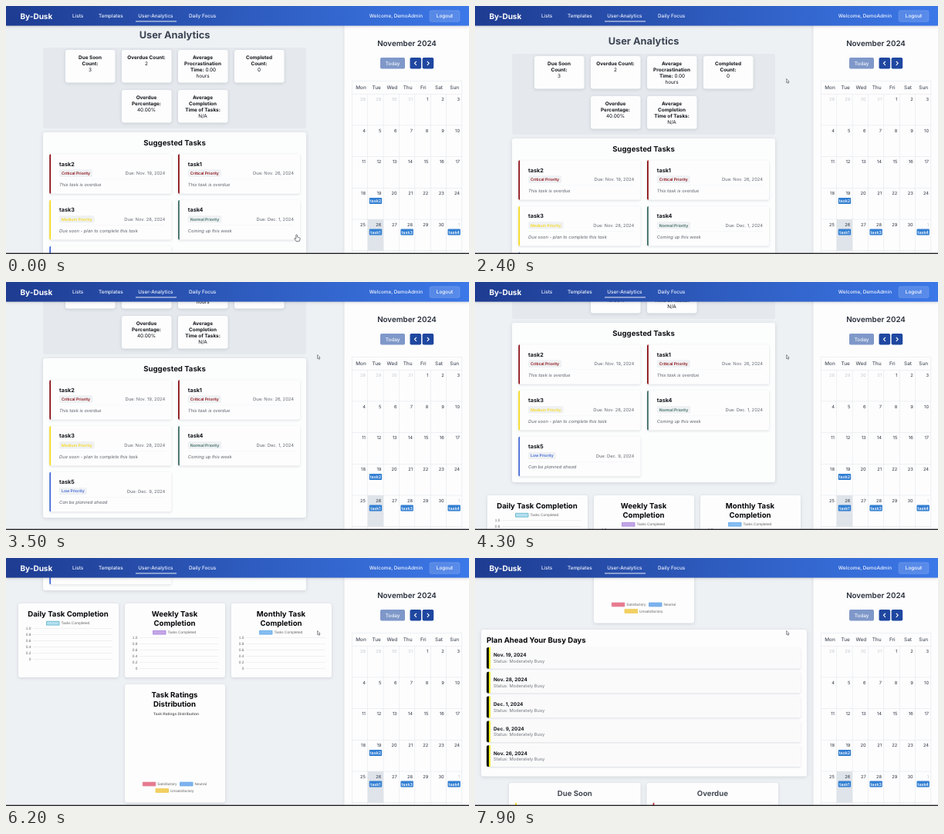
These frames come from a looping animation (600 by 322 pixels, 8 s). An HTML page with a canvas:

```html
<!DOCTYPE html>
<html lang="en">
<head>
<meta charset="utf-8">
<title>User Analytics</title>
<style>
html, body { margin: 0; width: 100%; height: 100%; overflow: hidden; background: #eef1f4; }
canvas { display: block; width: 600px; height: 322px; }
</style>
</head>
<body>
<canvas id="stage"></canvas>
<script>
const W = 600, H = 322, LOOP = 8000, STEP = 100;
const canvas = document.getElementById('stage');
const ctx = canvas.getContext('2d');
const dpr = window.devicePixelRatio || 1;
canvas.width = W * dpr;
canvas.height = H * dpr;
ctx.textRendering = 'geometricPrecision';

const INTER = 'Inter, sans-serif';
const ARIAL = '"Liberation Sans", Arial, sans-serif';
const INK = '#111318', GREY = '#656a72';

// y is the middle of the capital letters
function text(str, x, y, size, weight, color, align = 'left', family = INTER) {
  ctx.font = `${weight} ${size}px ${family}`;
  ctx.fillStyle = color;
  ctx.textAlign = align;
  ctx.fillText(str, x, y + size * 0.364);
}

function rect(x, y, w, h, color) {
  ctx.fillStyle = color;
  ctx.fillRect(x, y, w, h);
}

function round(x, y, w, h, r, color, stroke) {
  ctx.beginPath();
  ctx.roundRect(x, y, w, h, r);
  if (color) { ctx.fillStyle = color; ctx.fill(); }
  if (stroke) { ctx.strokeStyle = stroke; ctx.stroke(); }
}

function card(x, y, w, h, r = 3, color = '#fdfdfe', blur = 4) {
  ctx.save();
  ctx.shadowColor = 'rgba(30,41,59,.15)';
  ctx.shadowBlur = blur * dpr;
  ctx.shadowOffsetY = dpr;
  round(x, y, w, h, r, color);
  ctx.restore();
}

// piecewise linear value from [time, value] points
function track(points, t) {
  for (let i = 1; i < points.length; i++) {
    const [t0, a] = points[i - 1], [t1, b] = points[i];
    if (t <= t1) return a + (b - a) * (t - t0) / (t1 - t0);
  }
  return points[points.length - 1][1];
}

const SCROLL = [[0, 8], [400, 0], [2600, 0], [3500, 73], [4300, 119],
  [5200, 219], [6200, 337], [7900, 570]];

function drawStats() {
  text('User Analytics', 218.5, 45, 12.8, 700, '#3b4453', 'center');
  round(48, 62, 341, 105, 3, '#e5e9ee');
  const stats = [
    [77, 65, ['Due Soon', 'Count:'], '3'],
    [150, 65, ['Overdue Count:'], '2'],
    [223, 65, ['Average', 'Procrastination'], 'hours'],
    [296, 65, ['Completed', 'Count:'], '0'],
    [150, 117, ['Overdue', 'Percentage:'], '40.00%'],
    [223, 117, ['Average', 'Completion', 'Time of Tasks:'], 'N/A']
  ];
  for (const [x, y, label, value] of stats) {
    card(x, y, 64.5, 42.5);
    const mid = x + 32;
    let line = y + 9.8;
    for (const part of label) {
      text(part, mid, line, 6.4, 700, INK, 'center');
      line += 7.8;
    }
    if (value === 'hours') {
      text('Time:', 239, line, 6.4, 700, INK);
      text('0.00', 272, line, 6.4, 400, INK, 'right');
      line += 7.8;
    }
    text(value, mid, line, 6.4, 400, INK, 'center');
  }
}

const TASKS = [
  ['task2', 'Critical', 'Nov. 19', 'This task is overdue', '#8b0f14'],
  ['task1', 'Critical', 'Nov. 26', 'This task is overdue', '#8b0f14'],
  ['task3', 'Medium', 'Nov. 28', 'Due soon - plan to complete this task', '#f5d91c'],
  ['task4', 'Normal', 'Dec. 1', 'Coming up this week', '#3c6b62'],
  ['task5', 'Low', 'Dec. 9', 'Can be planned ahead', '#4169d8']
];

function edgeCard(x, y, w, h, color) {
  card(x, y, w, h, 2.5, '#fdfdfe', 3);
  round(x, y, 1.8, h, [1.8, 0, 0, 1.8], color);
}

function drawTasks() {
  card(48, 172, 341, 207, 3, '#fcfdfd', 5);
  text('Suggested Tasks', 218.5, 186, 9.6, 700, INK, 'center');
  TASKS.forEach(([name, level, date, note, color], i) => {
    const x = 56.3 + (i % 2) * 166.7, y = 200.3 + Math.floor(i / 2) * 59.7;
    edgeCard(x, y, 158.2, 51.5, color);
    text(name, x + 12.8, y + 12.8, 7.2, 700, INK);
    const label = level + ' Priority';
    ctx.font = `600 5.12px ${INTER}`;
    round(x + 12.8, y + 20, ctx.measureText(label).width + 6, 9.6, 1.6, '#eff1f3');
    text(label, x + 15.8, y + 24.9, 5.12, 600, color);
    text(`Due: ${date}, 2024`, x + 150, y + 24.9, 5.8, 400, GREY, 'right');
    rect(x + 12.8, y + 32.4, 137, 0.4, '#eceef1');
    text(note, x + 12.8, y + 39.7, 5.76, 'italic 400', '#5d636b');
  });
}

function legend(x, y, label, fill, edge) {
  ctx.lineWidth = 0.8;
  ctx.beginPath();
  ctx.rect(x, y - 2.4, 16.5, 4.8);
  ctx.fillStyle = fill;
  ctx.fill();
  ctx.strokeStyle = edge;
  ctx.stroke();
  text(label, x + 19, y, 4.8, 400, '#666', 'left', ARIAL);
}

function drawCharts() {
  const charts = [
    [16, ['Daily Task Completion'], '#b4dff0', '#55b2c4'],
    [154, ['Weekly Task', 'Completion'], '#c4a6e6', '#a584dd'],
    [292, ['Monthly Task', 'Completion'], '#86bdf0', '#5fa9ea']
  ];
  for (const [x, title, fill, edge] of charts) {
    card(x, 396, 130, 96);
    let y = 409.7;
    for (const line of title) {
      text(line, x + 64.5, y, 9.6, 700, '#050608', 'center');
      y += 12;
    }
    legend(x + 36.5, y, 'Tasks Completed', fill, edge);
    for (let i = 0; i <= 5; i++) {
      const gy = y + 7 + i * 7.9;
      rect(x + 19, gy - 0.2, 102.5, 0.4, '#dcd8dc');
      text(i === 5 ? '0' : (1 - i / 5).toFixed(1), x + 16.5, gy, 4.8, 400, '#666', 'right', ARIAL);
    }
  }
  card(154, 501, 130, 153.5);
  text('Task Ratings', 218.5, 515, 9.6, 700, '#050608', 'center');
  text('Distribution', 218.5, 527, 9.6, 700, '#050608', 'center');
  text('Task Ratings Distribution', 220.5, 539, 4.9, 700, '#666', 'center', ARIAL);
  legend(177.3, 630.5, 'Satisfactory', '#e8798f', '#e0798f');
  legend(225.5, 630.5, 'Neutral', '#7db2ee', '#65a5e8');
  legend(194, 639, 'Unsatisfactory', '#f3d063', '#eec84e');
}

function drawBusyDays() {
  card(8, 663, 422, 190.5, 3, '#fdfdfe', 5);
  text('Plan Ahead Your Busy Days', 15, 676.2, 9.6, 700, '#050608');
  ['Nov. 19', 'Nov. 28', 'Dec. 1', 'Dec. 9', 'Nov. 26'].forEach((day, i) => {
    const y = 686 + i * 31.8;
    card(15, y, 407, 27.8, 2, '#fafafb', 2);
    round(15, y, 3, 27.8, [2, 0, 0, 2], '#0d0d0d');
    rect(18, y, 2, 27.8, '#eeee1c');
    text(day + ', 2024', 24, y + 10, 6.4, 700, INK);
    text('Status: Moderately Busy', 24, y + 18, 5.76, 400, '#74787e');
  });
  const lists = [[44, 'Due Soon', '#f5d91c'], [222.5, 'Overdue', '#c8323c']];
  for (const [x, title, color] of lists) {
    card(x, 862, 170.5, 90);
    text(title, x + 85.3, 875.3, 9.6, 700, '#454b55', 'center');
    edgeCard(x + 8, 887.5, 154.5, 40, color);
  }
}

function drawHeader() {
  ctx.save();
  ctx.shadowColor = 'rgba(0,0,0,.2)';
  ctx.shadowBlur = 4 * dpr;
  const g = ctx.createLinearGradient(0, 0, W, 0);
  g.addColorStop(0, '#1e3c91');
  g.addColorStop(1, '#3c78e8');
  rect(0, 0, W, 25.6, g);
  ctx.restore();
  text('By-Dusk', 18.5, 13, 10, 700, '#fff');
  const nav = [[86, 'Lists'], [120, 'Templates'], [171.3, 'User-Analytics'], [237, 'Daily Focus']];
  for (const [x, label] of nav) text(label, x, 13, 6.4, 500, '#f0f4ff');
  rect(168, 19.5, 53, 0.9, '#fff');
  text('Welcome, DemoAdmin', 540, 13, 6.4, 500, '#f0f4ff', 'right');
  ctx.lineWidth = 0.5;
  round(549, 5.8, 39, 14.6, 2.5, 'rgba(255,255,255,.15)', 'rgba(255,255,255,.25)');
  text('Logout', 568.5, 13, 6.4, 500, '#fff', 'center');
}

function chevron(x, dir) {
  round(x, 67, 14.6, 14.6, 1.8, '#1f47a0');
  const m = x + 7.3;
  ctx.beginPath();
  ctx.moveTo(m - dir * 1.1, 71.8);
  ctx.lineTo(m + dir * 1.3, 74.3);
  ctx.lineTo(m - dir * 1.1, 76.8);
  ctx.lineWidth = 1.1;
  ctx.strokeStyle = '#fff';
  ctx.stroke();
}

function drawCalendar() {
  ctx.save();
  ctx.shadowColor = 'rgba(30,41,59,.18)';
  ctx.shadowBlur = 5 * dpr;
  rect(438.5, 20, 170, 310, '#fdfdfe');
  ctx.restore();
  text('November 2024', 519.5, 48, 9.8, 600, '#262d38', 'center');
  round(485, 67, 32, 14.6, 1.8, '#7f98c9');
  text('Today', 501, 74.2, 6.4, 500, '#f4f7fc', 'center');
  chevron(523.5, -1);
  chevron(539.6, 1);

  const x0 = 448.4, y0 = 114.2, cw = 20.35, ch = 40.7, line = '#dfe2e6';
  rect(x0 + cw, y0 + 4 * ch, cw, ch, '#dfe4ea');
  for (const x of [x0, x0 + 7 * cw]) rect(x - 0.25, 97.5, 0.5, 17, line);
  rect(x0, 97.3, cw * 7, 0.5, line);
  for (let c = 0; c <= 7; c++) rect(x0 + c * cw - 0.25, y0, 0.5, 210, line);
  for (let r = 0; r <= 5; r++) rect(x0, y0 + r * ch - 0.25, cw * 7, 0.5, line);

  ['Mon', 'Tue', 'Wed', 'Thu', 'Fri', 'Sat', 'Sun'].forEach((d, c) =>
    text(d, 460 + c * 20.2, 106, 6.4, 500, '#4a515c', 'center'));
  for (let i = 0; i < 35; i++) {
    const n = i - 3, out = n < 1 || n > 30;
    const day = n < 1 ? n + 31 : n > 30 ? n - 30 : n;
    text(day, x0 + (i % 7 + 1) * cw - 2.8, y0 + Math.floor(i / 7) * ch + 6.7,
      5.76, 400, out ? '#c6cad0' : '#2c333e', 'right');
  }
  const events = [['task2', 1, 3], ['task1', 1, 4], ['task3', 3, 4], ['task4', 6, 4]];
  for (const [name, c, r] of events) {
    const x = x0 + c * cw + 2, y = y0 + r * ch + 12.6;
    round(x, y, 16.4, 8, 1, '#337fd2');
    text(name, x + 8.2, y + 4, 5.5, 500, '#fff', 'center');
  }
}

function drawCursor(t) {
  const p = track([[0, 0], [700, 0], [1600, 1], [LOOP, 1]], t);
  const e = p * p * (3 - 2 * p);
  const hand = e < 0.16;
  ctx.save();
  ctx.translate(376.6 + 27 * e, 297 - 202.5 * e);
  if (!hand) ctx.scale(0.85, 0.85);
  ctx.lineWidth = 0.7;
  ctx.lineJoin = 'round';
  ctx.fillStyle = '#fff';
  ctx.strokeStyle = '#44484f';
  const path = new Path2D(hand
    ? 'M-.8 .3Q0-.5 .8 .3V3L3.8 3.8Q4.6 4.2 4.4 5.4L3.6 8.4H-.6L-2.9 5.2Q-2.8 4.2-1.8 4.7L-.8 5.4Z'
    : 'M0 0V6L1.4 4.8L2.4 7L3.4 6.5L2.4 4.4H4.2Z');
  ctx.fill(path);
  ctx.stroke(path);
  ctx.restore();
}

function draw(t) {
  ctx.setTransform(dpr, 0, 0, dpr, 0, 0);
  rect(0, 0, W, H, '#eef1f4');
  ctx.save();
  ctx.translate(0, -track(SCROLL, t));
  drawStats();
  drawTasks();
  drawCharts();
  drawBusyDays();
  ctx.restore();
  drawCalendar();
  drawHeader();
  rect(0, 320.6, W, 1.4, '#25272b');
  drawCursor(t);
}

function tick() {
  const t = performance.now() % LOOP;
  draw(Math.floor(t / STEP) * STEP);
  requestAnimationFrame(tick);
}
tick();
</script>
</body>
</html>
```
